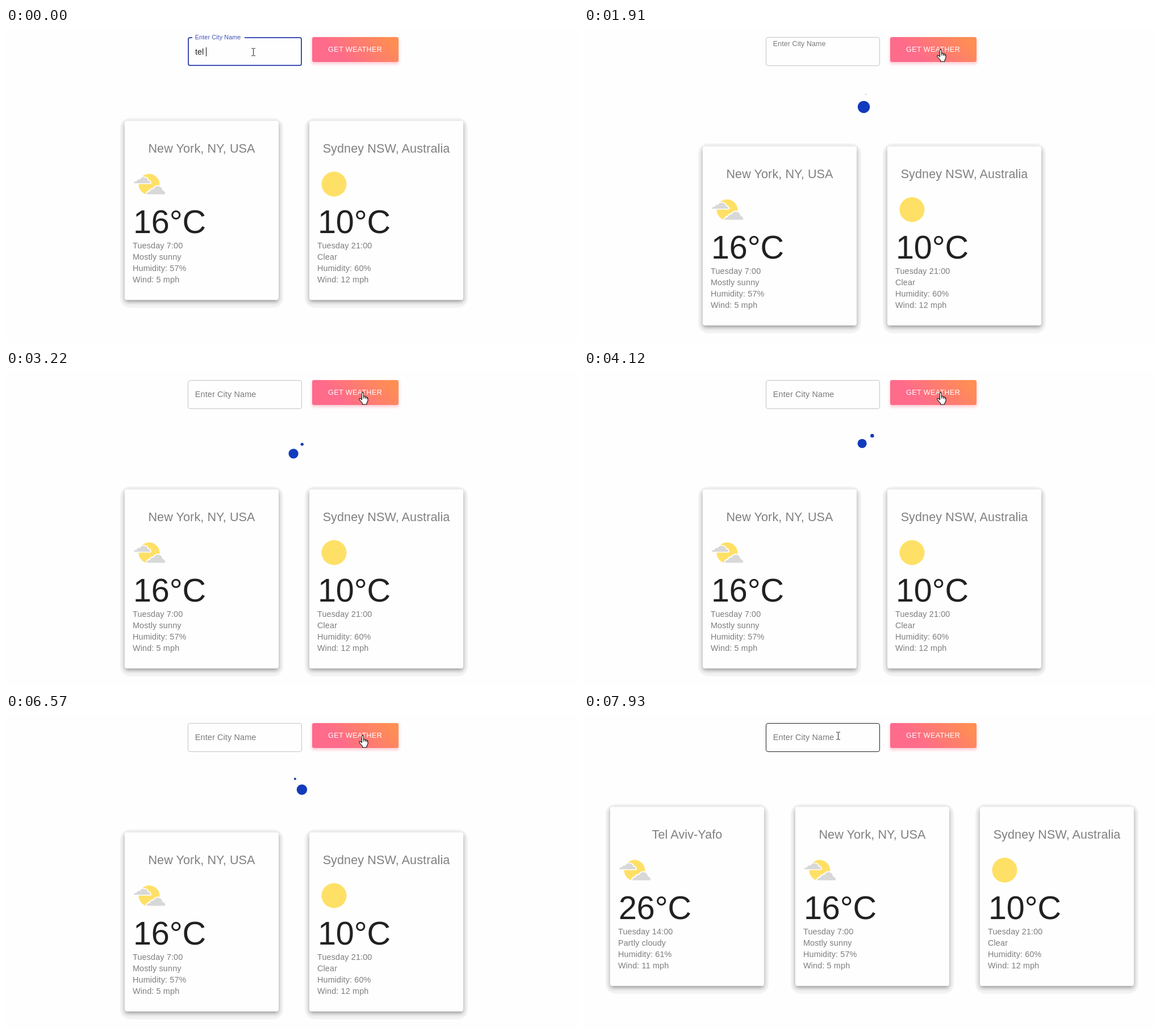
An HTML page that plays this animation: 1007x556 px, repeating every 8 s.

```html
<!DOCTYPE html>
<html lang="en">
<head>
<meta charset="utf-8">
<title>City weather</title>
<style>
  html, body { margin: 0; width: 100%; height: 100%; overflow: hidden; background: #fefefe; }
  body { position: relative; font-family: "Liberation Sans", Arial, sans-serif; }
  svg { position: absolute; left: 0; top: 0; overflow: visible; }
  text { white-space: pre; }

  #field {
    position: absolute; left: 320px; top: 16px; width: 201px; height: 51px;
    box-sizing: border-box; border: 1px solid #c4c4c4; border-radius: 4px;
  }
  #field.hover { border-color: #222; }
  #field.focus { border: 2px solid #3f51b5; }
  #button {
    position: absolute; left: 539px; top: 16px; width: 152px; height: 44px; border-radius: 3px;
    background: linear-gradient(45deg, #fe6b8b 30%, #ff8e53 90%);
    box-shadow: 0 3px 4px 1px rgba(255, 105, 135, .3);
  }

  .card { position: absolute; left: 0; top: 164px; width: 271px; height: 316px; }
  .card::before {
    content: ""; position: absolute; inset: -5px -8px -14px; border-radius: 18px; background: #f4f4f4;
  }
  .card::after {
    content: ""; position: absolute; inset: 0; border-radius: 4px; background: #fefefe;
    box-shadow: 0 4px 6px -1px rgba(0, 0, 0, .2), 0 3px 8px rgba(0, 0, 0, .22);
  }
  .card svg { z-index: 1; }
  .title { font-size: 21.6px; letter-spacing: .08px; fill: #808080; text-anchor: middle; }
  .temp { font-size: 57.6px; letter-spacing: -.2px; fill: #212121; }
  .line { font-size: 14.4px; letter-spacing: .135px; fill: #7e7e7e; }
  .cloud { fill: #d8d8d8; stroke: #fefefe; stroke-width: 4; paint-order: stroke; }
</style>
</head>
<body>
<div id="field"></div>
<div id="button"></div>
<div id="cards"></div>

<svg width="1007" height="556">
  <rect id="notch" x="328" y="15" width="92" height="4" fill="#fefefe"/>
  <text id="label" font-size="14.4" letter-spacing=".135">Enter City Name</text>
  <text id="typed" x="333" y="47" font-size="14.4" fill="#212121"></text>
  <path id="squiggle" fill="none" stroke="#e8323c"/>
  <rect id="caret" y="34" width="1" height="16" fill="#111"/>
  <text x="567" y="42" font-size="12.6" letter-spacing=".37" fill="#fff">GET WEATHER</text>
  <g id="spinner" fill="#123abc"><circle/><circle/></g>
  <path id="beam" d="M-3.5-6.5h2.5l1 1 1-1h2.5M0-5.5v11M-3.5 6.5h2.5l1-1 1 1h2.5" fill="none" stroke="#222"/>
  <path id="hand" d="M-2.5-9.3q1.5-1.6 3 0v6.3q2-.8 3 .8 2-.6 2.8 1 1.8-.2 1.8 1.8v4l-2.1 4.4v2h-7.5v-2l-5.5-6.5q-.8-2 1.3-2.4l3.2 2.4z
    M.5-3v3.5M3.5-2v3M6.3-1v2.5" fill="#fff" stroke="#111" stroke-width="1.1" stroke-linejoin="round"/>
</svg>

<script>
const LOOP = 8000, CLICK = 1910, DONE = 6720;
const $ = id => document.getElementById(id);

const CLOUD = 'M0 15a4.5 4.5 0 0 1 5.5-4.5a5 5 0 0 1 6.5-4.5a8 8 0 0 1 15.5 2.5a5 5 0 0 1 4.5 6.5z';
const cloud = (x, y, sx, sy) =>
  `<path class="cloud" d="${CLOUD}" transform="translate(${x} ${y}) scale(${sx} ${sy})"/>`;
const sun = (x, y, r) => `<circle cx="${x}" cy="${y}" r="${r}" fill="#ffe066"/>`;
const clear = sun(43.5, 111.5, 22);
const cloudy = sun(43, 112, 18.5) + cloud(16, 99, .9, .73) + cloud(39, 114.5, 1, 1);

function addCard(title, icon, temp, ...lines) {
  const el = document.createElement('div');
  el.className = 'card';
  el.innerHTML = `<svg width="271" height="316">
    <text class="title" x="135.5" y="56">${title}</text>${icon}
    <text class="temp" x="15" y="198">${temp}°C</text>
    ${lines.map((s, i) => `<text class="line" x="14" y="${225 + 20 * i}">${s}</text>`).join('')}</svg>`;
  $('cards').append(el);
  return el;
}
const cards = [
  addCard('Tel Aviv-Yafo', cloudy, 26, 'Tuesday 14:00', 'Partly cloudy', 'Humidity: 61%', 'Wind: 11 mph'),
  addCard('New York, NY, USA', cloudy, 16, 'Tuesday 7:00', 'Mostly sunny', 'Humidity: 57%', 'Wind: 5 mph'),
  addCard('Sydney NSW, Australia', clear, 10, 'Tuesday 21:00', 'Clear', 'Humidity: 60%', 'Wind: 12 mph')
];

// Times at which the moving parts advance: [first, last, count]
const ticks = [[1330, 2360, 8], [2510, 3520, 8], [3670, 4700, 8], [4820, 5840, 8], [5990, 6720, 6]]
  .flatMap(([a, b, n]) => Array.from({ length: n }, (_, i) =>
    Math.floor((a + (b - a) * i / (n - 1)) / 10) * 10));

const typing = [[0, 'tel '], [160, 'tel a'], [300, 'tel av'], [440, 'tel aviv'], [CLICK, '']];
const caretOn = [[0, 1], [1020, 0], [1480, 1], [CLICK, 0]];
const pointer = [
  [0, 'beam', 435.5, 42.5], [1330, 'beam', 452.5, 42.5], [1480, 'beam', 505.5, 43.5],
  [1620, 'hand', 612, 47], [1770, 'hand', 629, 48],
  [7780, 'beam', 497.5, 40.5], [7930, 'beam', 447.5, 38.5]
];
// Label: 1 = raised into the border, 0 = resting in the field
const raised = [[0, 1], [CLICK, .55], [2060, 0]];
// Spinner clock in seconds
const spinClock = [[1910, .05], [2360, .5], [4120, 2.3], [5270, 3.5], [6570, 4.82], [6720, 4.97]];

const at = (table, t) => table.findLast(row => row[0] <= t);
const show = (el, on) => { el.style.display = on ? '' : 'none'; };

function lerp(table, t) {
  const i = Math.max(1, table.findIndex(row => row[0] >= t));
  const [[t0, v0], [t1, v1]] = [table[i - 1], table[i]];
  return v0 + (v1 - v0) * (t - t0) / (t1 - t0);
}

const pen = document.createElement('canvas').getContext('2d');
pen.font = '14.4px "Liberation Sans", Arial, sans-serif';

let zigzag = 'M353 47.5';
for (let i = 1; i <= 12; i++) zigzag += `L${353 + 2 * i} ${i % 2 ? 49.5 : 47.5}`;
$('squiggle').setAttribute('d', zigzag);

function drawField(t) {
  const focus = t < CLICK, text = at(typing, t)[1], k = at(raised, t)[1];
  $('field').className = focus ? 'focus' : t >= 7780 ? 'hover' : '';
  $('typed').textContent = text;
  $('caret').setAttribute('x', Math.round(333 + pen.measureText(text).width));
  $('label').setAttribute('transform', `translate(332.8 ${46 - 26 * k}) scale(${1 - .25 * k})`);
  $('label').setAttribute('fill', focus ? '#3f51b5' : '#7a7a7a');
  show($('notch'), focus);
  show($('caret'), at(caretOn, t)[1]);
  show($('squiggle'), t >= 440 && focus);
}

function drawCards(t) {
  const done = t >= DONE, dy = t >= CLICK && !done ? 45 : 0;
  show(cards[0], done);
  cards.forEach((el, i) => {
    const x = done ? [46, 372, 697][i] : [0, 209, 534][i];
    el.style.transform = `translate(${x}px, ${dy}px)`;
  });
}

// Two dots a quarter turn apart circle the centre and swell in turn, every two seconds.
function drawSpinner(t) {
  const on = t >= CLICK && t < DONE;
  show($('spinner'), on);
  if (!on) return;
  const s = lerp(spinClock, ticks.findLast(v => v <= t));
  [...$('spinner').children].forEach((dot, i) => {
    const a = Math.PI * (s + 1.25 - i * .5);
    const size = 1 - Math.abs((s + i) % 2 - 1);
    dot.setAttribute('cx', 505.4 + 15.9 * Math.cos(a));
    dot.setAttribute('cy', 130 + 15.9 * Math.sin(a));
    dot.setAttribute('r', 11.25 * size);
  });
}

function drawPointer(t) {
  const [, kind, x, y] = at(pointer, t);
  for (const id of ['beam', 'hand']) {
    show($(id), id === kind);
    $(id).setAttribute('transform', `translate(${x} ${y})`);
  }
}

function draw() {
  const t = performance.now() % LOOP;
  drawField(t);
  drawCards(t);
  drawSpinner(t);
  drawPointer(t);
  requestAnimationFrame(draw);
}
draw();
</script>
</body>
</html>
```
